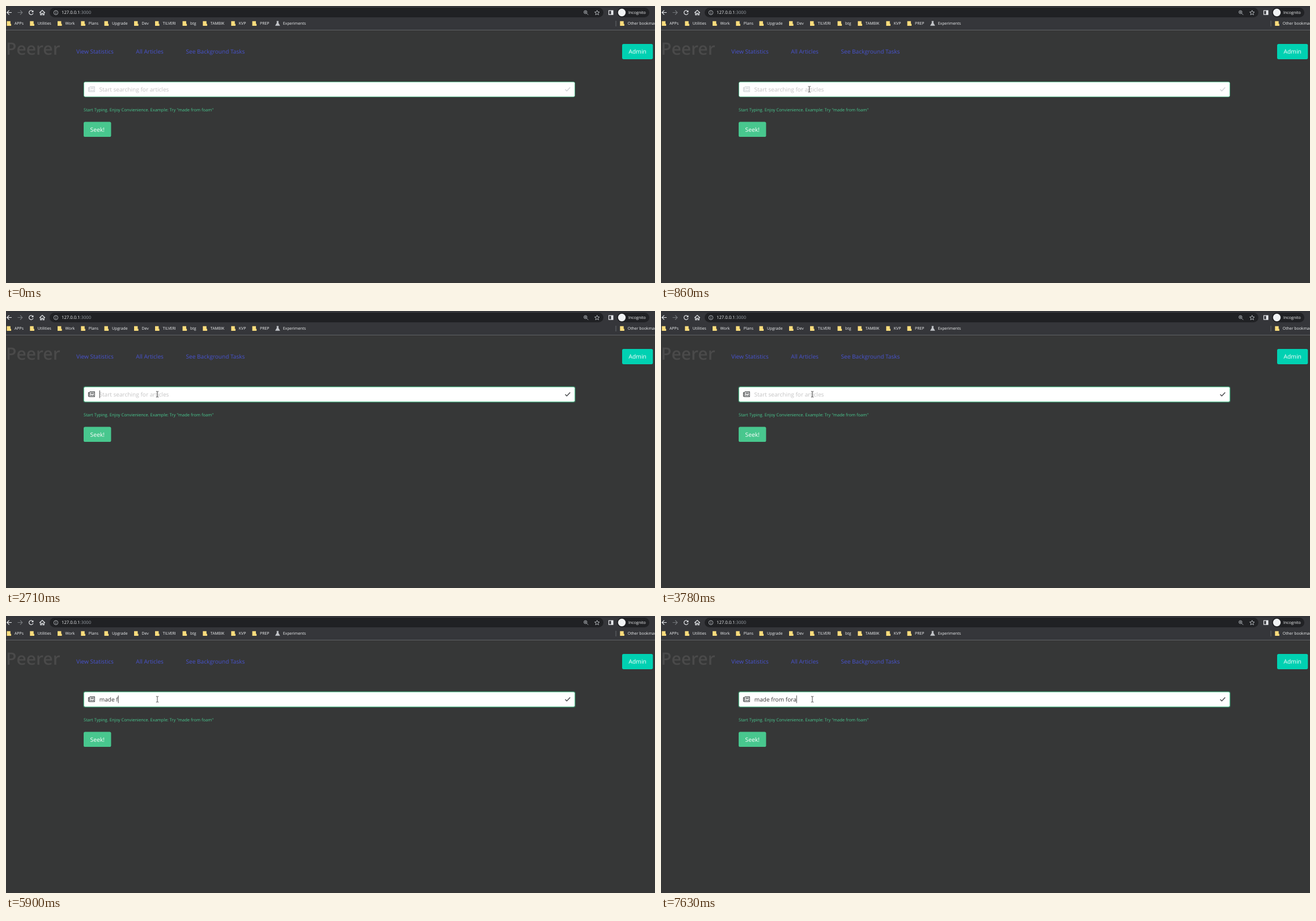
Animation of 1145 by 489 pixels, one loop 8 s. Source, as an HTML page:

```html
<!DOCTYPE html>
<html lang="en">
<head>
<meta charset="utf-8">
<title>Article search</title>
<style>
  html, body { margin: 0; width: 100%; height: 100%; overflow: hidden; background: #363737; }
  svg { display: block; width: 1145px; height: 489px; }
  text { font: 10.1px "Open Sans", "Noto Sans", sans-serif; text-rendering: geometricPrecision; white-space: pre; }
  .bar text { fill: #f1f3f4; font-size: 6.9px; }
  .line { fill: none; stroke: #e8eaed; stroke-width: 1.2; }
  .link { fill: #4853cf; }
  .button { fill: #fff; font-size: 10.3px; text-anchor: middle; }
</style>
</head>
<body>
<svg viewBox="0 0 1145 489">
  <g class="bar">
    <rect width="1145" height="42" fill="#35363a"/>
    <rect y="42" width="1145" height="1" fill="#606265"/>
    <rect x="77" y="3" width="977" height="17" rx="8.5" fill="#202124"/>
    <rect x="1078" y="3" width="57" height="17" rx="8.5" fill="#202124"/>

    <g class="line">
      <path d="M10 11.5H2M5.6 7.7L1.8 11.5L5.6 15.3"/>
      <path d="M20.5 11.5H28.5M25 7.7L28.8 11.5L25 15.3" stroke="#75787c"/>
      <path d="M47.2 9.2A3.7 3.7 0 1 0 47.9 12.6"/>
      <path d="M48.4 7.4V11H44.8Z" fill="#e8eaed" stroke="none"/>
      <path d="M59.2 12L64 7.5L68.8 12M60.8 11V15.6H62.8V12.8H65.2V15.6H67.2V11"/>
      <g stroke="#bdc1c6" stroke-width=".9">
        <circle cx="88" cy="11.7" r="3.7"/>
        <path d="M88 11.2V13.8M88 9.3V10.3"/>
        <circle cx="1022.3" cy="10.8" r="2.7"/>
        <path d="M1024.3 12.8L1027.2 15.7M1021 10.8H1023.6M1022.3 9.5V12.1"/>
        <path d="M1042.8 7.6L1044 10.4L1047 10.7L1044.7 12.7L1045.4 15.6L1042.8 14L1040.2 15.6L1040.9 12.7L1038.6 10.7L1041.6 10.4Z"/>
      </g>
      <rect x="1063.5" y="8.1" width="7.4" height="7"/>
    </g>
    <rect x="1067.5" y="8" width="3.5" height="7.2" fill="#e8eaed"/>
    <circle cx="1086.5" cy="11.5" r="6.7" fill="#f1f3f4"/>
    <text x="98" y="14.4" style="font-size:7.7px">127.0.0.1<tspan fill="#9aa0a6">:3000</tspan></text>
    <text x="1098" y="14.1" style="font-size:7.1px">Incognito</text>

    <g id="bookmarks"></g>
    <path d="M477.3 27H481.1M478 27V30L475.3 34.6H483.1L480.4 30V27Z" fill="#c4c7cb" stroke="#c4c7cb" stroke-width=".6"/>
    <text x="488.7" y="33.3">Experiments</text>
    <rect x="1075.5" y="26" width="1" height="10" fill="#66696d"/>
  </g>

  <text x="0" y="85.7" fill="#4a4a4a" style="font-size:30px;font-weight:600">Peerer</text>
  <text class="link" x="124" y="83.8">View Statistics</text>
  <text class="link" x="229.3" y="83.8">All Articles</text>
  <text class="link" x="317.5" y="83.8">See Background Tasks</text>
  <rect x="1087" y="67" width="54.3" height="27" rx="2.7" fill="#00d1b2"/>
  <text class="button" x="1114.2" y="84">Admin</text>

  <rect id="glow" x="136" y="132.7" width="869" height="29" rx="3.5" fill="#3a5b4d"/>
  <rect x="137.4" y="134.1" width="866.2" height="26.2" rx="2.5" fill="#fff" stroke="#48c78e" stroke-width=".8"/>
  <g id="icons" fill="none" stroke="currentColor">
    <path d="M147.6 142.6H156.2V151.2H146.8Q145.5 151.2 145.5 149.8V144.2H147.4V150" stroke-width="1.2"/>
    <path d="M149.2 145.2H154.8M149.2 148.6H151.4M152.6 148.6H154.8" stroke-width="1.6"/>
    <path d="M986.6 147.2L989.4 150L995.3 143.8" stroke-width="1.5"/>
  </g>
  <text id="hint" x="164.5" y="151.2" fill="#c4c4c4">Start searching for articles</text>
  <circle id="click" cx="260.5" cy="146.3" r="7.3" fill="#f5ef3c" opacity=".85"/>
  <text id="typed" x="164.8" y="151.2" fill="#363636"></text>
  <rect id="caret" y="140.3" width=".9" height="13.4" fill="#363636"/>

  <text x="137" y="185.6" fill="#48c78e" style="font-size:7.54px">Start Typing. Enjoy Convienience. Example: Try "made from foam"</text>
  <rect x="137" y="204.4" width="48.4" height="26.7" rx="2.7" fill="#48c78e"/>
  <text class="button" x="161.2" y="221.7">Seek!</text>

  <path id="arrow" d="M0 0V9.6L2.2 7.6L3.7 11L5.3 10.3L3.8 7H6.7Z" fill="#fff" stroke="#111" stroke-width=".6"/>
  <path id="beam" d="M-2.2 -5H-.6L0 -4.4L.6 -5H2.2M0 -4.4V4.4M-2.2 5H-.6L0 4.4L.6 5H2.2" fill="none" stroke="#333" stroke-width=".9"/>
</svg>
<script>
const LOOP = 8000, FOCUS = 1130, CLICK_END = 1260, NUDGE = 1590;
const MOVE_START = 110, MOVE_END = 860, STEP = 68, BLINK = 530;
const PHRASE = "made from fora";
const KEY_TIMES = [4770, 4900, 5160, 5300, 5430, 5900, 6030, 6360, 6560, 6630, 7100, 7290, 7360, 7630];
const FOLDERS = [
  [1.5, "APPs"], [42.3, "Utilities"], [91, "Work"], [132.3, "Plans"], [173.5, "Upgrade"], [226, "Dev"],
  [263, "TILVERI"], [311.5, "btg"], [347.3, "TAMBIK"], [397.3, "KVP"], [434.5, "PREP"], [1083.3, "Other bookmarks"]
];

const $ = id => document.getElementById(id);
const show = (id, on) => $(id).setAttribute("visibility", on ? "visible" : "hidden");

$("bookmarks").innerHTML = FOLDERS.map(([x, name]) =>
  `<path d="M${x} 26.8h6.4v4.8h1.2v3.4h-7.6z" fill="#fbdc7c"/>
   <text x="${x + 13.5}" y="33.3">${name}</text>`).join("");

function pointer(t) {
  if (t >= NUDGE) return [267, 147];
  if (t >= MOVE_END) return [261.7, 147];
  const at = Math.floor((t - MOVE_START) / STEP) * STEP;
  const left = 1 - at / (MOVE_END - MOVE_START);
  return [261.7 + 741 * left ** 2.81, 147 + 306 * left ** 2];
}

function draw(t) {
  const focused = t >= FOCUS;
  const count = KEY_TIMES.filter(k => k <= t).length;
  const blinkOn = Math.floor((t - FOCUS) / BLINK) % 2 === 0;
  show("glow", focused);
  $("icons").style.color = focused ? "#45484a" : "#cfd3d6";
  show("hint", !count);
  show("click", focused && t < CLICK_END);

  const typed = $("typed");
  typed.textContent = PHRASE.slice(0, count);
  $("caret").setAttribute("x", 164.8 + (count ? typed.getComputedTextLength() : 0));
  show("caret", focused && (count || blinkOn));

  const [x, y] = pointer(t);
  const inField = x > 137 && x < 1004 && y > 134 && y < 161;
  for (const id of ["arrow", "beam"]) {
    $(id).setAttribute("transform", `translate(${x} ${y})`);
    show(id, t >= MOVE_START && inField === (id === "beam"));
  }
}

let start;
function frame(now) {
  start ??= now;
  draw((now - start) % LOOP);
  requestAnimationFrame(frame);
}
draw(0);
requestAnimationFrame(frame);
</script>
</body>
</html>
```
